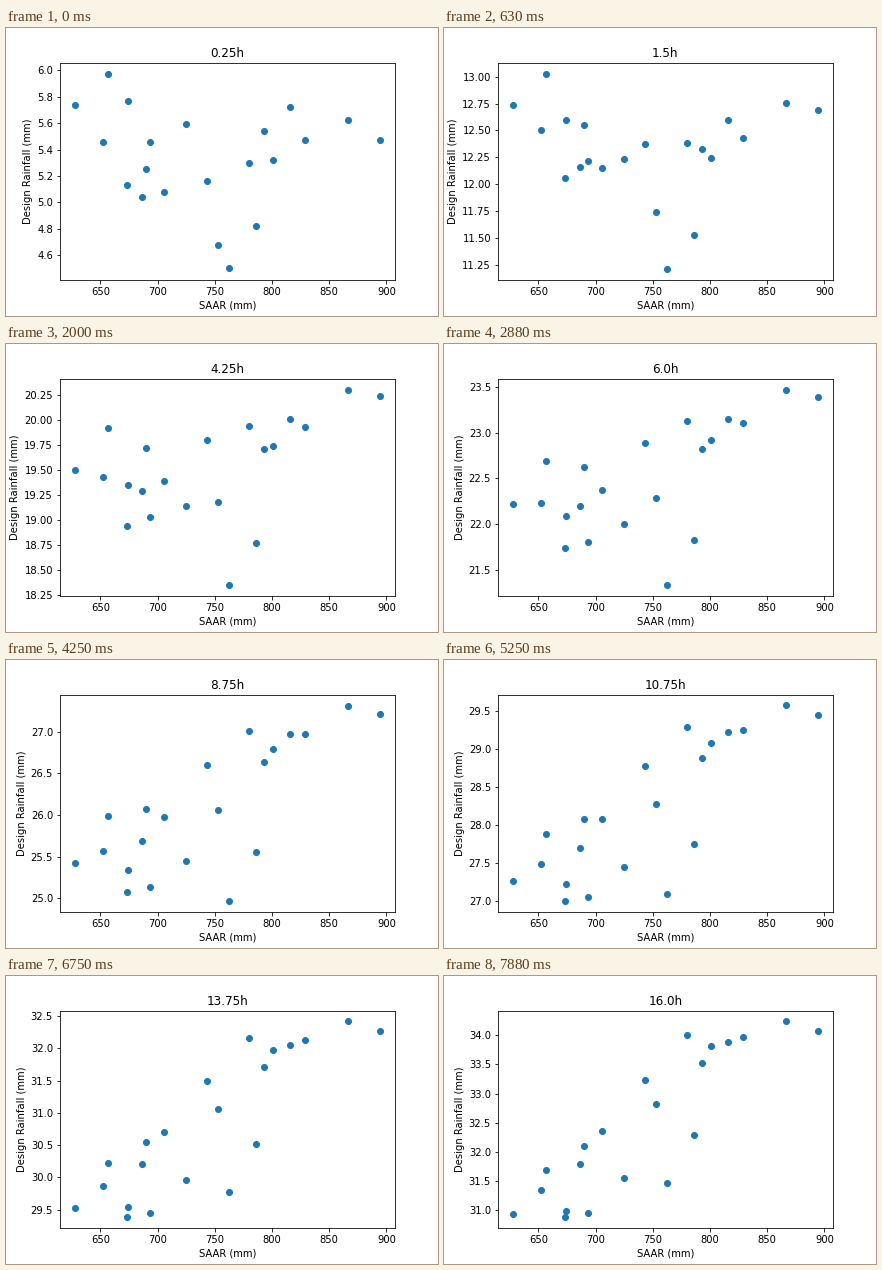
A matplotlib script that plays this animation: 432x288 px, repeating every 8000 ms.

```python
import numpy as np
import matplotlib.pyplot as plt
from matplotlib.animation import FuncAnimation

FRAMES = 64
INTERVAL = 125                          # ms
STEP = 0.25                             # hours added per frame
MARKER_RADIUS = 3                       # px
KEY_HOURS = np.array([0.25, 2.75, 16])  # short, middle and long storm
BEND = -7.8                             # cubic term shared by all sites

plt.rcParams.update({"font.family": "DejaVu Sans", "font.size": 10})

# Each site: SAAR, then its rainfall in the short, middle and long storm
sites = np.array([
    (628, 5.74, 16.41, 30.94), (652, 5.46, 16.25, 31.35), (656.5, 5.97, 16.76, 31.69),
    (673, 5.13, 15.78, 30.88), (674, 5.77, 16.25, 30.99), (686.5, 5.04, 16.01, 31.79),
    (690, 5.25, 16.43, 32.10), (693.5, 5.46, 15.89, 30.95), (705.5, 5.08, 16.04, 32.36),
    (725, 5.59, 15.94, 31.55), (743, 5.16, 16.36, 33.23), (753, 4.68, 15.72, 32.83),
    (762.5, 4.50, 15.03, 31.47), (780, 5.30, 16.42, 34.01), (786, 4.82, 15.39, 32.29),
    (793, 5.54, 16.26, 33.53), (801, 5.32, 16.24, 33.82), (816, 5.72, 16.55, 33.88),
    (829, 5.47, 16.43, 33.97), (866, 5.62, 16.79, 34.24), (894, 5.47, 16.73, 34.07),
])
saar, depths = sites[:, 0], sites[:, 1:].T


def warp(hours):
    return hours ** 0.2


knots = warp(KEY_HOURS)
a, b, c = np.polyfit(knots, depths, 2)


def rainfall(hours):
    """Depth-duration curve of every site: a parabola through its three storms."""
    z = warp(hours)
    return (a * z + b) * z + c + BEND * np.prod(z - knots)


def limits(values, length):
    pad = MARKER_RADIUS / length
    lo, hi = values.min() - pad, values.max() + pad
    margin = 0.05 * (hi - lo)
    return lo - margin, hi + margin


fig, ax = plt.subplots(figsize=(6, 4), dpi=72, facecolor="white")
fig.subplots_adjust(left=0.125, right=0.9, bottom=0.125, top=0.88)
width, height = 432 * 0.775, 288 * 0.755

dots = ax.scatter(saar, rainfall(STEP), color="#1f77b4")
ax.set_xlim(limits(saar, width))
ax.set_xlabel("SAAR (mm)")
ax.set_ylabel("Design Rainfall (mm)")


def update(frame):
    hours = STEP * (frame + 1)
    y = rainfall(hours)
    dots.set_offsets(np.column_stack([saar, y]))
    ax.set_ylim(limits(y, height))
    ax.set_title(f"{hours}h")
    return dots,


anim = FuncAnimation(fig, update, frames=FRAMES, interval=INTERVAL,
                     repeat=True, repeat_delay=0, blit=False)
plt.show()
```
